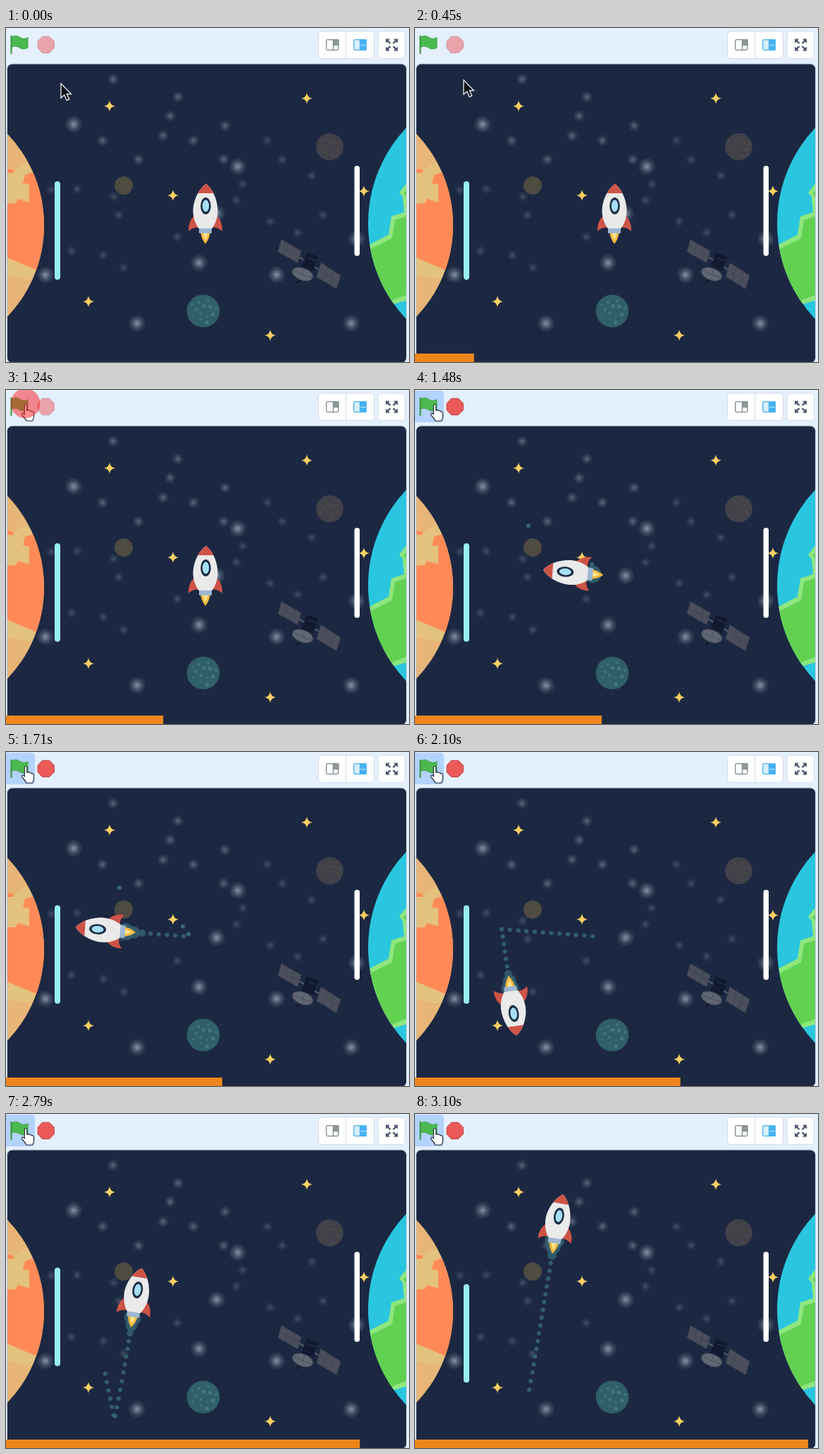
An HTML page that plays this animation: 572x475 px, repeating every 3170 ms.

```html
<!DOCTYPE html>
<html lang="en">
<head>
<meta charset="utf-8">
<title>Rocket game</title>
<style>
  html, body { margin: 0; width: 100%; height: 100%; overflow: hidden; background: #e5f0ff; }
  svg { display: block; width: 572px; height: 475px; }
</style>
</head>
<body>
<svg viewBox="0 0 572 475" xmlns="http://www.w3.org/2000/svg">
  <defs>
    <clipPath id="stage"><rect x="2" y="51.5" width="566" height="424.5" rx="7"/></clipPath>
    <clipPath id="marsClip"><circle cx="-134.5" cy="280.5" r="188.5"/></clipPath>
    <clipPath id="earthClip"><circle cx="712" cy="278" r="198"/></clipPath>
    <clipPath id="hull"><path id="hullPath" d="M1-42.500C11-35 17.500-18 17.500-4C17.500 6 14 15 9.500 21H-9.500C-14 15-17.500 6-17.500-4C-17.500-18-10-35 1-42.500Z"/></clipPath>
    <radialGradient id="glow">
      <stop offset="0" stop-color="#a9b7c2" stop-opacity=".75"/>
      <stop offset=".3" stop-color="#93a2b0" stop-opacity=".55"/>
      <stop offset=".6" stop-color="#7f8fa0" stop-opacity=".28"/>
      <stop offset="1" stop-color="#7f8fa0" stop-opacity="0"/>
    </radialGradient>
    <path id="spark" d="M0-8Q1-1 8 0Q1 1 0 8Q-1 1-8 0Q-1-1 0-8Z" fill="#fbd062"/>
  </defs>

  <!-- toolbar -->
  <rect id="hover" x="-5" y="1" width="46" height="45" rx="5" fill="#b3d3ff"/>
  <path d="M8 13C13 10 17 11 20 13.500C24 16 28 15.500 31 13.500V28C27 30.500 22 30 19 28C15 25.500 11 25.500 8 27.500Z" fill="#4cb950" stroke="#3f9f45"/>
  <path d="M7.500 11.500V36" stroke="#3f9a43" stroke-width="2.200" stroke-linecap="round"/>
  <path id="stop" d="M51.500 12H61.500L68.500 19V28.500L61.500 35.500H51.500L45 28.500V19Z" fill="#ec5959" stroke="#b84848"/>
  <g fill="#fff" stroke="#d3dae6">
    <rect x="443.5" y="4.500" width="79" height="39" rx="5"/>
    <rect x="528" y="4.500" width="38.500" height="39" rx="5"/>
    <path d="M482.500 5V43"/>
  </g>
  <g fill="none" stroke="#7d8790" stroke-width="1.300">
    <rect x="454.700" y="16.700" width="17" height="14.600" rx="1.500"/>
    <rect x="464.500" y="16.700" width="7.200" height="7.500" fill="#909a96"/>
    <path d="M464.500 24V31"/>
  </g>
  <g stroke="#46b1f2" stroke-width="1.300">
    <rect x="493.700" y="16.700" width="17.500" height="14.600" rx="1.500" fill="#d8effd"/>
    <path d="M502.500 17H511V31H502.500Z" fill="#46b1f2"/>
    <path d="M503 24.500H511" stroke="#a9dcfa"/>
  </g>
  <g id="expand" fill="#4d5670"></g>

  <!-- stage -->
  <rect x="1.500" y="51" width="567" height="425.500" rx="7.500" fill="#1c2842" stroke="#bccbe0"/>
  <g clip-path="url(#stage)">
    <g id="sky"></g>
    <circle cx="167" cy="224" r="13" fill="#4c4a41"/>
    <circle cx="459.500" cy="169" r="19.300" fill="#41414a"/>
    <circle cx="280" cy="402.500" r="23.300" fill="#305f69"/>
    <g id="craters"></g>

    <g clip-path="url(#marsClip)">
      <rect y="90" width="60" height="380" fill="#e8b578"/>
      <path d="M0 200L38 206L60 200V350L43 345L0 327Z" fill="#ff8a57"/>
      <path d="M0 206H11V202L30 191L38 205L27 209L24 221L33 222V248L17 243L14 249L0 250ZM0 326L43 344L37 358L0 352Z" fill="#e3c27e"/>
    </g>
    <g clip-path="url(#earthClip)">
      <rect x="510" y="80" width="62" height="396" fill="#2ac6df"/>
      <path d="M512 310L543 294L547 268L565 262L563 240L558 234L570 219V387L552 392L540 400L505 350Z" fill="#8fe67f"/>
      <path d="M512 317L548 299L552 273L570 267V379L551 386L538 395L505 350ZM570 230L564 235L570 243Z" fill="#62d152"/>
    </g>

    <!-- satellite -->
    <g fill="#4a4f5b" stroke="#3a4050" stroke-width=".7">
      <path d="M415 325L445 344" stroke="#5a606c" stroke-width="2"/>
      <path d="M391 301L419 317L414 334L386 318ZM447 334L475 352L469 371L441 354Z"/>
      <path d="M388.500 309.500L416.500 325.500M444 344L472 361.500M400 306L395 323M410 312L405 329M456 340L450 360M466 346L460 366" fill="none"/>
    </g>
    <path d="M427 319.500L443.500 325L436 346L419.500 340Z" fill="#121a30"/>
    <path d="M429 327L441 331" stroke="#2d374b"/>
    <path d="M421 350L413 363" stroke="#10182a" stroke-width="2.500"/>
    <ellipse cx="421" cy="350" rx="15" ry="8.500" transform="rotate(20 421 350)" fill="#606672" stroke="#454c5a"/>
    <path d="M408 345L421 351L434 355M421 351L424 342" stroke="#474d5a" fill="none"/>

    <rect x="494.500" y="196" width="7.500" height="128" rx="3.500" fill="#fff"/>
    <rect id="paddle" x="69" width="8" height="140" rx="4" fill="#98edf5"/>
    <g id="trail" fill="#3a6a76" stroke="#2b505f" stroke-width=".8"></g>

    <g id="rocket">
      <path d="M-7 25H7Q6 36 0 43Q-6 36-7 25Z" fill="#f9b93f"/>
      <path d="M-3.500 26H3.500Q3 33 0 38Q-3 33-3.500 26Z" fill="#ffe38a"/>
      <path d="M-15 2Q-25 11-24 25Q-17 19-10 20ZM15 2Q25 11 24 25Q17 19 10 20Z" fill="#ce5347"/>
      <rect x="-9" y="20" width="18" height="8" rx="1" fill="#9cb7d3"/>
      <use href="#hullPath" fill="#eaeaea"/>
      <rect x="-20" y="-45" width="40" height="16" clip-path="url(#hull)" fill="#ce5347"/>
      <ellipse cx=".5" cy="-11" rx="7.300" ry="12" fill="#1c2d42"/>
      <ellipse cx=".5" cy="-11" rx="4.700" ry="8.500" fill="#a5def5"/>
    </g>
  </g>

  <rect id="bar" y="463" height="12" fill="#ef861c"/>
  <path id="arrow" d="M0 0V20.500L4.800 16.200L8.200 24L11.800 22.400L8.400 14.800H14.500Z" fill="#10131c" stroke="#fff" stroke-width="1.200"/>
  <path id="hand" d="M-1.700 2Q0-1.500 1.700 2V9Q4 7.500 5 9.500Q7.500 8.500 8.300 10.800Q11.500 10 11.500 13.500V18Q11 21 9.500 24H1Q-1 20-5 16Q-6.500 12.500-3.500 13L-1.700 14.500Z" transform="translate(28 20)" fill="#fff" stroke="#1d2230" stroke-width="1.100"/>
  <circle id="click" cx="27.500" cy="19" r="21" fill="rgba(255,30,30,.5)"/>
</svg>

<script>
const NS = 'http://www.w3.org/2000/svg';
const $ = id => document.getElementById(id);
const add = (parent, tag, attrs) => {
  const el = document.createElementNS(NS, tag);
  for (const key in attrs) el.setAttribute(key, attrs[key]);
  return parent.appendChild(el);
};
const show = (el, on) => { el.style.display = on ? '' : 'none'; };

// scenery
const glow = (list, r, opacity) => list.split(' ').forEach(p => {
  const [cx, cy] = p.split(',');
  add($('sky'), 'circle', { cx, cy, r, opacity, fill: 'url(#glow)' });
});
glow('96,137 329,197 299,264 274,334 384,351 186,420 490,420 56,351 498,300', 13, 1);
glow('152,73 244,98 233,125 223,153 266,160 311,139 137,160 188,187 309,187', 9, .6);
glow('371,160 392,187 434,210 336,222 327,245 243,297 375,275 414,291 450,266 160,266 153,240 93,317 138,323 167,341 64,230 101,229', 8, .38);
for (const p of ['147,111', '427,100', '237,238', '508,232', '117,389', '375,437'])
  add($('sky'), 'use', { href: '#spark', transform: `translate(${p})` });

const craters = (x, y, r, fill) => {
  for (let i = 1; i < 14; i++) {
    const a = i * 2.4, d = r * .84 * Math.sqrt(i / 14);
    add($('craters'), 'circle', { cx: x + d * Math.cos(a), cy: y + d * Math.sin(a), r: r * (.06 + i % 3 * .03), fill });
  }
};
craters(167, 224, 13, '#57533f');
craters(459.5, 169, 19, '#4c484c');
craters(280, 402.5, 23, '#427681');

for (const a of [0, 90, 180, 270])
  add($('expand'), 'path', { d: 'M8.500-8.500V-2.500L6.300-4.600L2.800-1.200L1.200-2.800L4.600-6.300L2.500-8.500Z', transform: `translate(547.500 24) rotate(${a})` });

// motion: every track is a list of [step, value...]
const durations = [...'78787887888889789787888878878878878887887'].map(d => d * 10);
const loop = 3170, steps = 41;
const flight = [[17, 283, 264], [18, 252, 262], [22.65, 123, 252], [27, 139, 361], [29.65, 154, 435], [32, 167, 366], [40, 202, 156]];
const pointer = [[0, 78, 79], [4, 76, 78], [6, 69, 74], [7, 59, 54], [8, 46, 36], [10, 28, 19]];
const paddleY = [[27, 218], [28, 182], [29, 148], [33, 148], [37, 242]];

function at(track, k) {
  if (k <= track[0][0]) return track[0].slice(1);
  for (let i = 1; i < track.length; i++) {
    const [a, b] = [track[i - 1], track[i]];
    if (k <= b[0]) {
      const f = (k - a[0]) / (b[0] - a[0]);
      return a.slice(1).map((v, j) => v + (b[j + 1] - v) * f);
    }
  }
  return track[track.length - 1].slice(1);
}

function heading(k) {
  if (k < 17.5) return 0;
  const i = Math.max(1, flight.findIndex(p => k <= p[0]));
  const [, x0, y0] = flight[i - 1], [, x1, y1] = flight[i];
  return Math.atan2(x1 - x0, y0 - y1) * 180 / Math.PI;
}

const tick = 4.65 / 11, life = 9.02;
const puffs = Array.from({ length: 52 }, (_, i) => {
  const born = 18 + i * tick, [cx, cy] = at(flight, born);
  return { born, el: add($('trail'), 'circle', { cx, cy }) };
});
const strays = [[161, 193], [251, 248], [259, 259]].map(([cx, cy]) => add($('trail'), 'circle', { cx, cy, r: 3 }));

function draw(k) {
  const [x, y] = at(flight, k), [px, py] = at(pointer, k);
  $('rocket').setAttribute('transform', `translate(${x} ${y}) rotate(${heading(k)})`);
  $('paddle').setAttribute('y', at(paddleY, k)[0]);
  $('bar').setAttribute('width', 572 * k / steps);
  $('arrow').setAttribute('transform', `translate(${px} ${py})`);
  show($('arrow'), k < 10);
  show($('hand'), k >= 10);
  show($('click'), k >= 15 && k < 17);
  show($('hover'), k >= 17);
  $('stop').setAttribute('opacity', k < 17 ? .5 : 1);
  for (const { born, el } of puffs) {
    const age = k - born, n = age / tick;
    show(el, n >= 1.8 && age < life);
    el.setAttribute('r', Math.max(3, 21 - 3.6 * n));
    el.setAttribute('opacity', n < 5 ? .75 : .85);
  }
  strays.forEach(el => show(el, k >= 19 && k < 25));
}

const start = performance.now();
function frame() {
  let t = (performance.now() - start) % loop, k = 0;
  while (k < steps - 1 && t >= durations[k]) t -= durations[k++];
  draw(k);
  requestAnimationFrame(frame);
}
frame();
</script>
</body>
</html>
```
